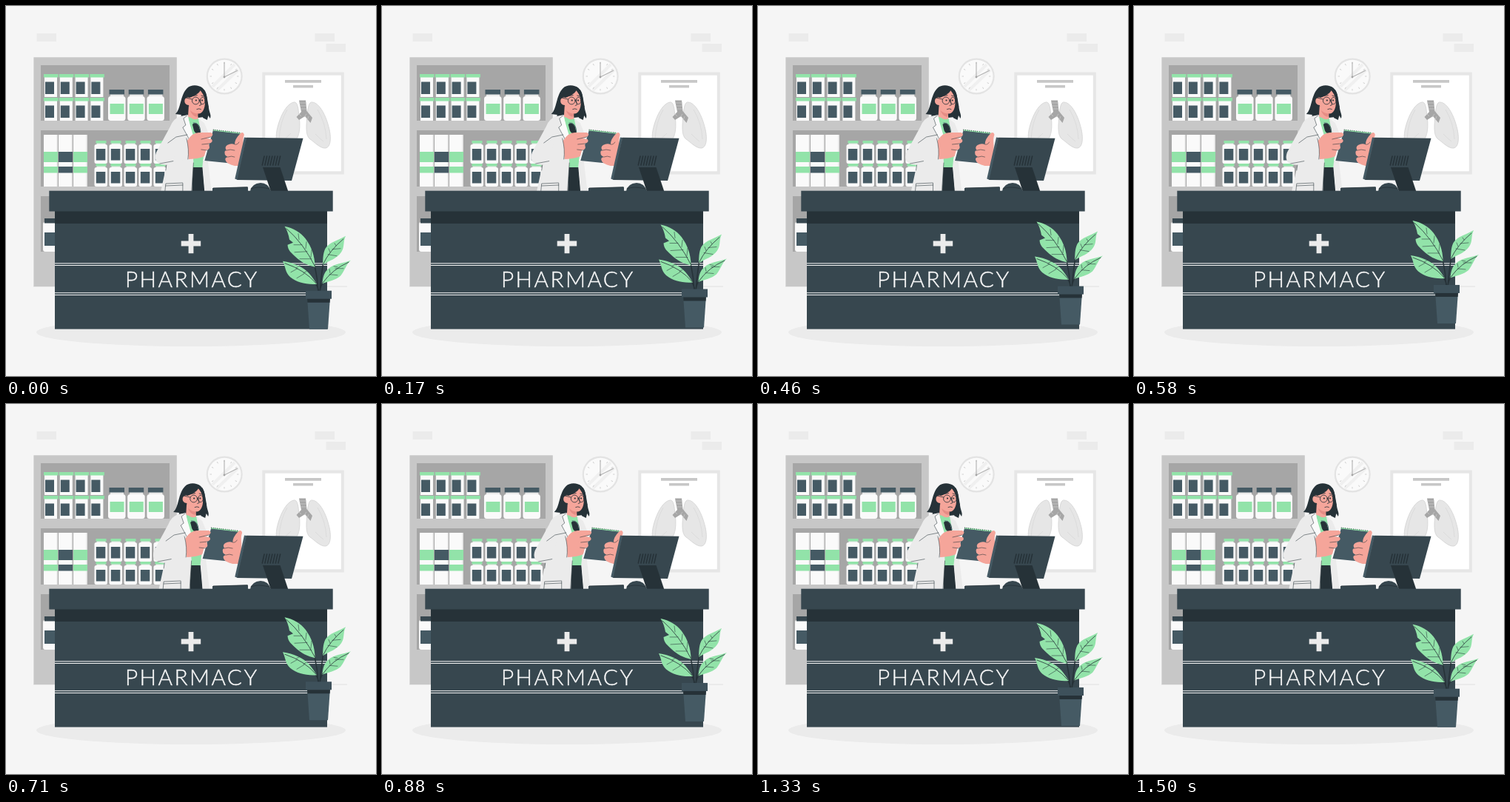
Animation of 500 by 500 pixels, one loop 1.54 s. Source, as an HTML page:

```html
<!DOCTYPE html>
<html lang="en">
<head>
<meta charset="utf-8">
<title>Pharmacy counter</title>
<style>
html, body { margin: 0; width: 100%; height: 100%; overflow: hidden; background: #f5f5f5; }
svg { display: block; width: 100vw; height: 100vh; }
.ln { fill: none; stroke: #263238; stroke-width: .8; stroke-linecap: round; stroke-linejoin: round; }
.thin { stroke-width: .55; }
.g { fill: #92e3a9; }
.d { fill: #37474f; }
.k { fill: #263238; }
.s { fill: #f5a59a; }
</style>
</head>
<body>
<svg viewBox="0 0 500 500" xmlns="http://www.w3.org/2000/svg">
  <rect width="500" height="500" fill="#f5f5f5"/>
  <path fill="#ebebeb" d="M41.5 37h26.5v11h-26.5zM417.5 37h26.5v11h-26.5zM432.5 51h26.5v11h-26.5z"/>
  <path d="M37 379H461" stroke="#e0e0e0"/>
  <ellipse cx="250" cy="441" rx="209" ry="19" fill="#ebebeb"/>

  <g id="shelf">
    <rect x="37.4" y="69.3" width="193.4" height="309.7" fill="#c7c7c7"/>
    <path fill="#a6a6a6" d="M47 80h174v75h-174zM47 168h174v76h-174zM47 257h174v75h-174z"/>
    <g id="goods"></g>
  </g>

  <g id="clock">
    <circle cx="295.2" cy="95" r="24.5" fill="#e3e3e3"/>
    <circle cx="295.2" cy="95" r="22.3" fill="#fafafa"/>
    <path d="M279 109L309 79M285 114L314 86" stroke="#f0f0f0" stroke-width="4"/>
    <g id="ticks" stroke="#c7c7c7" stroke-width=".8"></g>
    <path d="M295 96V76M295 96L313 87" stroke="#b0b0b0" stroke-width="1.1" fill="none"/>
    <circle cx="295" cy="96" r="1.4" fill="#a6a6a6"/>
  </g>

  <g id="poster">
    <rect x="346.3" y="89.5" width="110.5" height="138" fill="#e6e6e6"/>
    <rect x="350.3" y="93.7" width="102.5" height="129.6" fill="#fff"/>
    <path fill="#c7c7c7" d="M377 100h49v3.8h-49zM388 107h27v3.5h-27z"/>
    <g fill="#e6e6e6" stroke="#d2d2d2" stroke-width=".8">
      <path d="M389 130C379 132 370 149 366 168C364 180 365 191 370 192C377 193 386 184 391 181C397 177 398 161 396 149C395 138 394 129 389 130Z"/>
      <path d="M414 130C424 131 433 149 437 167C440 181 438 191 432 192C425 193 417 184 411 180C404 175 406 160 407 148C408 138 409 129 414 130Z"/>
    </g>
    <path d="M380 140Q370 157 369 181M385 172Q378 178 374 183M421 140Q432 158 433 180M418 173Q425 180 429 183" fill="none" stroke="#d9d9d9" stroke-width=".8"/>
    <path d="M396 127.5H405L406.5 142L414 151L411.5 158L404 149L396 154L392.5 150L399 143Z" fill="#a6a6a6"/>
    <path d="M396 131H406M397 135H406M398 139H406M396 146L399 149M406 146L403 150M409 149L407 154" stroke="#c7c7c7" stroke-width=".8"/>
  </g>

  <g id="woman">
    <path class="k" d="M245 111C250 106 260 106 266 111C272 117 272 127 274 136L268 150L242 153L241 148L236 152L237 147L229 146C237 139 235 121 245 111Z"/>
    <path class="s" d="M247 135L259 142L260 154L252 158L246 151Z"/>
    <path class="s" d="M248 124C254 122 260 119 263 114C267 118 269 123 269 131C269 138 266 145 261 145.5C256 145.5 249 141 247 134C239 134 240 121 248 124Z"/>
    <path d="M249 141Q254 145.5 260 145.5L258 150Q251 148 249 141Z" fill="#e58d85"/>
    <path class="k" d="M261 112L268 113C273 120 271 129 274 137C275 145 278 147 276 152L273.5 148L272 154L266 151C269 145 269 139 269.5 132C270 125 267 119 261 112Z"/>
    <g class="ln">
      <circle cx="256.5" cy="128" r="4.9"/>
      <ellipse cx="266" cy="128" rx="3.2" ry="4.6"/>
      <path d="M251.6 126L243 124M261.3 127L263 127M253.5 121.3L258.5 120.5M264 121L267.5 122M262 128L264 133.5L261.5 134.5M258 139.5Q261 138 263.5 139.5"/>
    </g>
    <circle class="k" cx="257" cy="127.5" r="1.1"/><circle class="k" cx="265.3" cy="127.5" r="1"/>
    <path class="g" d="M244 149L250 151Q255 155 260 152L265 158L270 180L267 219H249L246 190Z"/>
    <path class="k" d="M252 218H266L269 252H251.5Z"/>
    <path fill="#ebebeb" d="M260 152L268 158L275 175L273 210L278 252H268.5L265.5 217L268 195Z"/>
    <path fill="#ebebeb" d="M246 147L236 149Q226 152 222 163L203 198Q199 210 209 214L217 215L209 252H251L253.5 212L252 185Z"/>
    <path fill="#fafafa" d="M245 147L240 152L243 161L239 164L252 191L254 178Z"/>
    <path class="ln thin" d="M245 148L240 152L243 161L239 164L253 190M208 213L245 206M219 185L230 177L245 174M217 215L216 222M215 250L216 240L239 239V250M216 243L239 242M253.5 212L251 250"/>
    <path class="k" d="M252 160Q257 156 261 163L263 171Q257 175 254 168Z"/>
    <path d="M253 158Q262 157 263 170" fill="none" stroke="#455a64"/>
    <path class="s" d="M245 182Q252 171 261 171L277 171Q282 173 277 177L270 179L278 180Q281 184 275 186L276 190Q276 194 272 195L271 201Q266 206 247 207Z"/>
    <path fill="#ebebeb" d="M233 184L244 179Q248 194 246 207L226 211Z"/>
    <path class="ln thin" d="M244 179Q248 194 246 207"/>

    <path fill="#fafafa" d="M278 167.5L281 168L269.5 209.5L266.5 209Z"/>
    <path d="M280 168L317.5 172.5L303.5 212.5L268.5 209Z" fill="#455a64"/>
    <path d="M280 167.7L317.5 172" stroke="#92e3a9" stroke-width="1.6"/>
    <path d="M280 167.2L317.5 171.5" stroke="#263238" stroke-width="1.4" stroke-dasharray=".7 2"/>
    <path class="s" d="M263 171L277 171Q282 173 277 177L268 179L278 180Q281 184 274 186L275 190Q276 194 270 195L266 194L260 181Z"/>
    <path class="ln thin" d="M277 177L264 180M275 186L265 187M272 195L264 194"/>
    <path class="s" d="M317 172Q321 169 322 174Q320 179 321 187L321 216H309Q298 213 297 209Q295 205 300 204Q294 201 296 196L298 195Q295 191 299 188Q304 185 309 187Q309 180 317 172Z"/>
    <path class="ln thin" d="M309 187Q313 188 315 184M298 195Q303 193 309 195M300 204Q305 202 309 204"/>
  </g>

  <g id="desk">
    <path class="d" d="M279 246L327 244.5V250H279Z"/>
    <path d="M280 246L326 244.8" stroke="#263238" stroke-width=".8"/>
    <path class="d" d="M330 250Q332 240 344 239Q354 239 358 250Z"/>
    <path class="ln" d="M331 247Q340 243 356 247"/>
    <path d="M322 177.5L309.3 233.5L313 235L325.5 178Z" fill="#455a64"/>
    <path class="d" d="M325 177.8L401.5 178.7L386 236L312.3 235Z"/>
    <g id="vents" class="ln" style="stroke-width:1.5"></g>
    <path class="k" d="M347 218H370.5L381.5 251H358Z"/>
    <rect class="d" x="66" y="277" width="368" height="159.6"/>
    <rect class="k" x="66" y="277" width="368" height="17"/>
    <rect class="d" x="58.3" y="249.7" width="383.4" height="27.8"/>
    <path d="M66 347.8H434M66 350.5H434M66 387.7H434M66 390.5H434" stroke="#f5f5f5" stroke-width="1"/>
    <path d="M236.7 321H263.2M250 308V334.3" stroke="#ebebeb" stroke-width="6.8"/>
    <text x="161" y="380" font-family="Lato, 'Open Sans', sans-serif" font-weight="300" font-size="29.8" letter-spacing="2.4" fill="#fafafa" stroke="#fafafa" stroke-width=".4">PHARMACY</text>
  </g>

  <g id="plant">
    <path class="ln" style="stroke-width:1.5" d="M417 350Q421 368 422 387M428.5 349Q426 365 424 387M417 373Q421 378 423 387M429 373Q425 378 424 387"/>
    <path class="g" d="M376.5 298C388 300 398 306 405 315C413 326 417 337 417.7 353C408 351 398 346 391 339C386 334 381 331 380.5 323L388 320L383 316C382 310 380 303 376.5 298Z"/>
    <path class="g" d="M374 345C389 347 402 353 410 362C414 367 417 371 420 376C406 377 393 374 384 366.5C377 360 378 353 374 345Z"/>
    <path class="g" d="M459 311C455 319 458 326 453 333C447 342 437 344 428 350C428.5 343 428 335 431.5 328C437 319 449 317 459 311Z"/>
    <path class="g" d="M466 344C459 350 458 358 452 365C445 371 436 372 427.5 375.5C428 367 430 360 435 356C443 348 456 348 466 344Z"/>
    <g class="ln">
      <path d="M379 301Q402 321 417.5 352M377 348Q404 357 419 375M456 315Q437 331 428.5 349M463 346.5Q441 356 428 374.5"/>
      <path class="thin" d="M396 316L395 308M405 328L406 319M412 340L413 330M400 323L389 323M407 332L390 333M413 342L397 342M392 354L397 351M402 361L406 359M394 355L385 360M403 362L393 368M446 324L444 321M438 333L436 328M441 329L452 328M435 336L447 338M448 353L443 352M438 361L437 356M445 355L456 355M437 363L448 364"/>
    </g>
    <path d="M407 394H438L435 437H410Z" fill="#455a64"/>
    <path class="k" d="M407 395H438L437.6 401H407.4Z"/>
    <rect x="405" y="385" width="35" height="11" fill="#3e515b"/>
  </g>
</svg>
<script>
const $ = id => document.getElementById(id);
const INK = '#455a64', GREEN = '#92e3a9', WHITE = '#fafafa';
const box = (x, y, w, h, fill, r = 0) =>
  `<rect x="${x}" y="${y}" width="${w}" height="${h}" rx="${r}" fill="${fill}"/>`;

function jar(x, y) {
  return box(x + 1, y + 3, 17, 28, WHITE) + box(x, y, 19.5, 4.5, GREEN) +
    box(x + 2, y + 10.5, 12, 16.5, INK);
}

function bottle(x) {
  return box(x + 3, 118, 18, 8, '#ebebeb') + box(x, 122, 23.5, 33, WHITE, 3.5) +
    box(x + 2.5, 132, 19, 14, GREEN) + box(x + 1.5, 113, 20.5, 6.5, INK);
}

function vial(x, y) {
  return box(x + 3, y + 2, 12, 6, '#ebebeb') + box(x, y + 5, 17.5, 26, WHITE, 2.5) +
    box(x + 2, y, 14, 3.6, GREEN) + box(x + 2.3, y + 11, 12.5, 15.5, INK);
}

function binder(x, band) {
  return box(x, 174, 19, 70, WHITE) + box(x + 17.5, 174, 1.5, 70, '#e0e0e0') +
    box(x, 197, 19, 14, band) + box(x, 217, 19, 8.5, band);
}

let goods = '';
for (const y of [92, 124])
  for (let i = 0; i < 4; i++) goods += jar(51 + i * 20.8, y);
for (let i = 0; i < 3; i++) {
  goods += bottle(138 + i * 26.2);
  goods += binder(51 + i * 20, i === 1 ? INK : GREEN);
}
for (const y of [182, 213])
  for (let i = 0; i < 5; i++) goods += vial(119.5 + i * 20, y);
goods += box(50, 292, 24, 40, WHITE, 3) + box(52, 287, 20, 6.5, '#37474f') + box(52, 306, 22, 18, INK);
$('goods').innerHTML = goods;

let ticks = '';
for (let a = 0; a < 360; a += 30)
  ticks += `<path d="M295 75.5V78" transform="rotate(${a} 295 95)"/>`;
$('ticks').innerHTML = ticks;

let vents = '';
for (let i = 0; i < 7; i++) vents += `<path d="M${349 + i * 3.6} 203l-2.7 12"/>`;
$('vents').innerHTML = vents;

const LOOP = 1540, CYCLE = 1500, STEP = 1000 / 24, LEAD = 20;
const SHAKE = [0, -1, 2, -4, 4, -4, 4, -4, 2, -1, 0];

function draw(ms) {
  const t = Math.floor((ms % LOOP + 4) / STEP) * STEP;   // 24 poses a second
  const p = (t + LEAD) % CYCLE / CYCLE;
  const i = Math.floor(p * 10), part = p * 10 - i;
  const sway = SHAKE[i] + (SHAKE[i + 1] - SHAKE[i]) * part;
  const lift = 10 * (1 - Math.abs(1 - 2 * p));
  $('woman').setAttribute('transform', `translate(${sway.toFixed(3)} 0)`);
  $('plant').setAttribute('transform', `translate(0 ${(-lift).toFixed(3)})`);
}

const start = performance.now();
function tick() {
  draw(performance.now() - start);
  requestAnimationFrame(tick);
}
tick();
</script>
</body>
</html>
```
